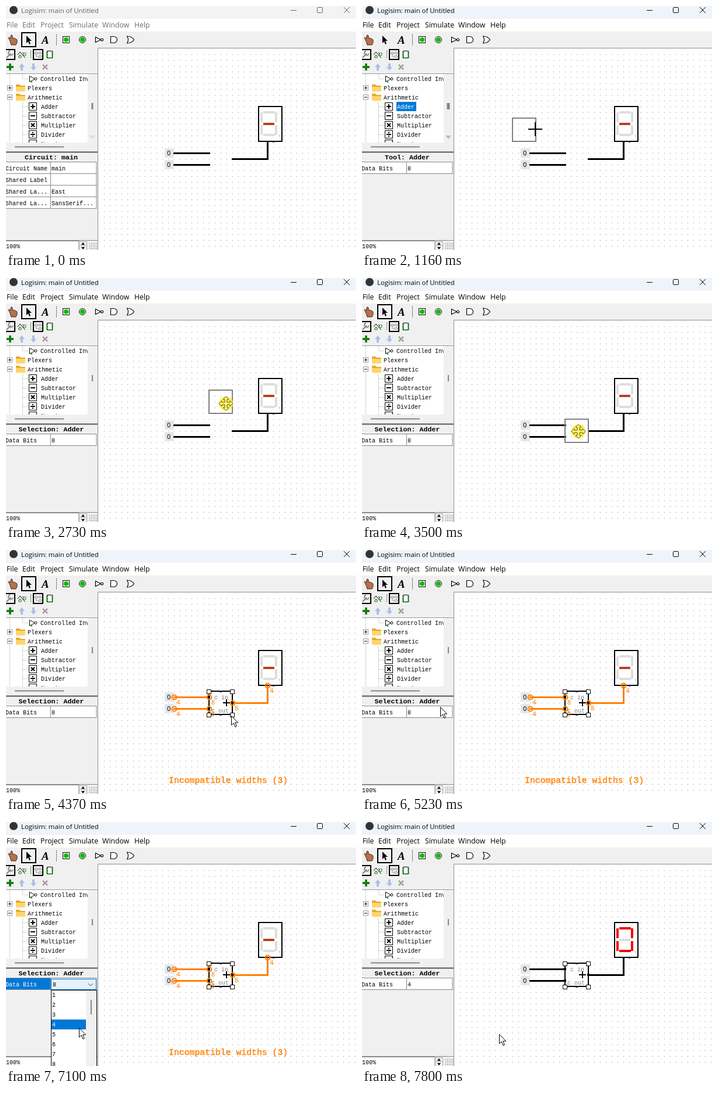
Write an HTML page that moves like this. It is 600x420 px and loops after 8000 ms.

```html
<!DOCTYPE html>
<html lang="en">
<head>
<meta charset="utf-8">
<title>Circuit editor</title>
<style>
  html, body { margin: 0; width: 100%; height: 100%; overflow: hidden; background: #fff; }
  svg { display: block; }
  text { white-space: pre; }
  .ui { font-family: "Open Sans", "Noto Sans", sans-serif; }
  .mono { font: 10px "Liberation Mono", monospace; }
  .head { font: bold 11.67px "Liberation Mono", monospace; }
  .num { font: 11px "Noto Sans", sans-serif; }
  .line { fill: none; stroke: #000; }
  .crisp { shape-rendering: crispEdges; }
</style>
</head>
<body>
<svg width="600" height="420" viewBox="0 0 600 420">
  <defs>
    <pattern id="dots" x="8" y="3" width="10" height="10" patternUnits="userSpaceOnUse">
      <rect width="1" height="1" fill="#858585"/>
    </pattern>
    <clipPath id="treeClip"><rect y="117" width="140" height="118"/></clipPath>
  </defs>

  <!-- window frame -->
  <rect width="600" height="420" fill="#f0f0f0"/>
  <rect id="bar" width="600" height="22" fill="#f3f3f3"/>
  <rect y="22" width="600" height="22" fill="#fff"/>
  <circle cx="13" cy="7" r="7" fill="#333"/>
  <g id="frame" class="ui">
    <text x="26" y="12" font-size="11.4">Logisim: main of Untitled</text>
    <g fill="none" stroke="#000">
      <path d="M488 7.5h10M579 2l10 10M589 2l-10 10"/>
      <rect x="533.5" y="2.5" width="9" height="9" rx="1"/>
    </g>
  </g>
  <g id="menu" class="ui" font-size="12.3"></g>

  <!-- main toolbar -->
  <path d="M6 58c-3-3-2-5 1-3l1 1v-5q2-2 3 0v4q2-1 3 1q2-1 3 1q2 0 2 2v4l-2 4h-8z" fill="#b5714a" stroke="#4a2412"/>
  <rect id="pick" class="line crisp" x="27" y="46" width="24" height="24" stroke-width="2"/>
  <path d="M35 51v13l3-3 2 5 2-1-2-5h4z"/>
  <text x="61" y="65" font-family="Liberation Serif, serif" font-size="19" font-weight="bold" font-style="italic">A</text>
  <path d="M86.5 48v20M42.5 76v14" stroke="#888"/>
  <rect x="97.500" y="52.500" width="11" height="11" fill="#fff" stroke="#000"/>
  <circle cx="103" cy="58" r="4" fill="#00c000"/>
  <circle cx="131" cy="58" r="5.500" fill="#fff" stroke="#000"/>
  <circle cx="131" cy="58" r="4" fill="#00c000"/>
  <g fill="#fff" stroke="#000" stroke-width="1.2">
    <path d="M153.500 53.500l9 4.500-9 4.500z"/><circle cx="164.500" cy="58" r="2"/>
    <path d="M179.500 52.500h5.500a5.500 5.500 0 0 1 0 11h-5.500z"/>
    <path d="M207.500 52q8 0 12 6q-4 6-12 6q4-6 0-12z"/>
  </g>

  <!-- side toolbars -->
  <rect class="line crisp" x="-2" y="75" width="17" height="17" stroke-width="2"/>
  <path d="M1 89l7-7M7 77a4 4 0 1 0 5 5" fill="none" stroke="#888" stroke-width="2"/>
  <path d="M20 84l4-5 4 5M28 80l5 4M24 84v5M28 84l5 5" class="line"/>
  <path d="M22 86h4v3h-4zM30 81h4v4h-4z" fill="#fff" stroke="#187a18"/>
  <rect class="line crisp" x="47" y="75" width="16" height="17" stroke-width="2"/>
  <path d="M49.500 79.500h4v3h-4zM56.500 79.500h4v3h-4zM56.500 85.500h4v3h-4zM52 83v4h4M54 81h2" fill="none" stroke="#999"/>
  <path d="M70.500 77.500h9v12h-9z" fill="#fff" stroke="#000"/>
  <path d="M69 80h3M69 84h3M69 88h3M78 80h3M78 84h3M78 88h3" stroke="#17a317" stroke-width="2"/>
  <path d="M1 105h12M7 99v12" stroke="#087808" stroke-width="3.500"/>
  <path d="M27 99l5 6h-3v6h-4v-6h-3zM47 111l5-6h-3v-6h-4v6h-3z" fill="#a9bfe8"/>
  <path d="M63 101l8 8M71 101l-8 8" stroke="#aaa19b" stroke-width="2.500"/>

  <!-- component tree -->
  <path d="M0 116.500h157" stroke="#999"/>
  <rect y="117" width="140" height="118" fill="#fff"/>
  <g id="tree" class="mono" clip-path="url(#treeClip)">
    <path d="M6.500 117v118M28.500 117v8M28.500 164v71M29 125.500h9" fill="none" stroke="#aaa" stroke-dasharray="1 1"/>
    <path d="M40.500 120.500l9 5-9 5z" fill="#fff" stroke="#000"/><circle cx="51" cy="125.500" r="2" fill="#fff" stroke="#000"/>
    <path d="M44 128v4" stroke="#0a0" stroke-width="2"/>
    <text x="59" y="129">Controlled Inverter</text>
    <rect id="treeSel" x="59" y="165" width="34" height="16" fill="#0078d7"/>
  </g>
  <rect id="thumb" y="167" height="11" fill="#858585"/>
  <path id="down" d="M143 223h10l-5 6z" fill="#bbb"/>
  <path d="M15 242.500h84" stroke="#858585" stroke-width="2"/>
  <path d="M0 251.500h157" stroke="#555" stroke-width="2"/>

  <!-- attributes -->
  <text id="title" class="head" text-anchor="middle" x="77.500" y="264"></text>
  <g id="table" class="mono"></g>
  <path d="M0 403.500h157" stroke="#888"/>
  <rect x="-1" y="404.500" width="126" height="16" fill="#fff" stroke="#888"/>
  <text class="mono" x="0" y="417">100%</text>
  <path d="M125.500 405.500h13v7h-13zM125.500 412.500h13v8h-13z" fill="#f0f0f0" stroke="#aaa"/>
  <path d="M129 411l3-4 3 4zM129 415l3 4 3-4z"/>
  <path d="M143 408.500h13M143 411.500h13M143 414.500h13M143 417.500h13" stroke="#444" stroke-dasharray="1 2"/>

  <!-- canvas -->
  <rect x="157" y="72" width="443" height="348" fill="#fff"/>
  <rect x="159" y="74" width="441" height="346" fill="url(#dots)" class="crisp"/>
  <path d="M157.500 420v-347.500h443" fill="none" stroke="#858b98"/>
  <rect x="433" y="173" width="40" height="60" fill="#fff" stroke="#000" stroke-width="2" class="crisp"/>
  <g id="digit" class="crisp"></g>
  <circle cx="469" cy="223.500" r="2" fill="#ddd"/>
  <rect x="457" y="233" width="3" height="2" fill="#33a"/>
  <path d="M272 245h16v16h-16zM272 265h16v16h-16z" fill="#e6e6e6"/>
  <path id="wires" d="M287 253.500h63M287 273.500h63M387 263.500h61.500v-30" fill="none" stroke-width="3"/>
  <text class="num" x="276" y="257">0</text><text class="num" x="276" y="277">0</text>
  <g id="adder">
    <rect x="-40" y="-20" width="40" height="40" fill="#fff" stroke="#000" stroke-width="2" class="crisp"/>
    <g class="mono" fill="#808080"><text x="-31" y="-6">c in</text><text x="-36" y="17">c out</text></g>
    <path d="M-16 0h12M-10-6v12" stroke="#000" stroke-width="2"/>
    <path d="M-42-12h4v4h-4zM-42 8h4v4h-4zM-2-2h4v4h-4z"/>
    <path d="M-22-21h4v3h-4zM-22 19h4v3h-4z" fill="#225"/>
    <path d="M-43.500-22.500h7v7h-7zM-3.500-22.500h7v7h-7zM-43.500 17.500h7v7h-7zM-3.500 17.500h7v7h-7z" fill="#fff" stroke="#000"/>
  </g>
  <rect id="ghost" class="crisp" x="-40" y="-20" width="40" height="40" fill="none" stroke="#808080" stroke-width="2"/>
  <g id="errors" class="num" fill="#ff8000">
    <text x="279" y="401" font-size="15" style="font:bold 14.800px 'Liberation Mono',monospace;font-weight:500" stroke="#ff8000" stroke-width=".4">Incompatible widths (3)</text>
  </g>

  <g id="popup" class="mono"></g>

  <!-- pointers -->
  <path id="arrow" d="M.5.500v16l3.700-3.500 2.700 6.500 2.500-1-2.700-6.300h5z" fill="#fff" stroke="#000"/>
  <path id="cross" class="crisp" d="M-12 0h24M0-12v24" stroke="#000" stroke-width="2"/>
  <g id="move">
    <circle r="12" fill="#fff04a"/>
    <path d="M0-12l5 5h-3v5h5v-3l5 5-5 5v-3h-5v5h3l-5 5-5-5h3v-5h-5v3l-5-5 5-5v3h5v-5h-3z" fill="#fff47a" stroke="#5c5720"/>
  </g>
</svg>
<script>
const $ = id => document.getElementById(id);
const add = (id, html) => $(id).insertAdjacentHTML('beforeend', html);
const show = (id, on) => { $(id).style.display = on ? '' : 'none'; };
const place = (id, x, y) => $(id).setAttribute('transform', `translate(${x} ${y})`);
const text = (x, y, s, extra = '') => `<text x="${x}" y="${y}" ${extra}>${s}</text>`;

const LOOP = 8000, TICK = 78;

// pointer path: tick, x, y
const path = [
  [0, -14, 225], [10, 74, 176], [12, 76, 176], [15, 297, 212], [22, 384, 198],
  [25, 384, 198], [27, 373, 206], [29, 373, 206], [31, 373, 198], [33, 373, 198],
  [35, 377, 216], [37, 380, 214], [39, 378, 224], [43, 372, 255], [45, 371, 264],
  [50, 371, 264], [61, 398, 302], [62, 385, 306], [67, 134, 270], [70, 99, 274],
  [76, 99, 274], [82, 101, 321], [86, 101, 321], [91, 125, 354], [94, 125, 354],
  [95, 95, 336], [96, 95, 336], [100, 235, 365], [103, 235, 365]
];

function pointer(k) {
  const i = path.findIndex(p => p[0] > k);
  const [a, x, y] = path[i - 1], [b, u, v] = path[i];
  const f = (k - a) / (b - a);
  return [Math.round(x + (u - x) * f), Math.round(y + (v - y) * f)];
}

const snap = (v, base) => base + 10 * Math.round((v - base) / 10);

function buildTree() {
  ['Plexers', 'Arithmetic'].forEach((name, i) => {
    const y = 141 + 16 * i;
    add('tree', `<rect x="2.5" y="${y - 4}" width="8" height="8" fill="#fff" stroke="#999"/>
      <path d="M4 ${y}h5${i ? '' : 'M6.5 ' + (y - 2.5) + 'v5'}" stroke="#000"/>
      <path d="M17 ${y - 6}h6l2 2h8v10h-16z" fill="#e8a92c"/>
      <path d="M17 ${y - 2}h16v8h-16z" fill="#ffd469"/>` + text(37, y + 4, name));
  });
  const signs = ['M-4 0h8M0-4v8', 'M-4 0h8', 'M-3-3l6 6M3-3l-6 6', 'M-4 0h8M-1-3h2M-1 3h2', 'M-4 0h8'];
  ['Adder', 'Subtractor', 'Multiplier', 'Divider', 'Negator'].forEach((name, i) => {
    const y = 173 + 16 * i;
    add('tree', `<path d="M29 ${y}.5h9" stroke="#aaa" stroke-dasharray="1 1"/>
      <rect x="39.5" y="${y - 6.5}" width="13" height="13" fill="#fff" stroke="#000"/>
      <path transform="translate(46 ${y})" d="${signs[i]}" stroke="#000" stroke-width="2"/>` +
      text(60, y + 4, name, i ? '' : 'id="adderName"'));
  });
}

function buildErrors() {
  for (const [x, y, bits] of [[288, 253, 4], [288, 273, 4], [348, 253, 8], [348, 273, 8], [388, 263, 8], [448, 233, 4]])
    add('errors', `<circle cx="${x + .5}" cy="${y + .5}" r="4" fill="none" stroke="#ff8000" stroke-width="2"/>` +
      text(x + 4, y + 13, bits));
}

function table(rows, active) {
  return rows.map(([name, value], i) => {
    const y = 268.5 + 20 * i;
    return `<rect x="-1" y="${y}" width="156" height="20" fill="#fff" stroke="#888"/>` +
      (active ? `<rect y="269" width="77" height="19" fill="#0078d7"/>` : '') +
      `<path d="M76.500 ${y}v20" stroke="#888"/>` +
      text(-1, y + 14, name, active ? 'fill="#fff"' : '') + text(78, y + 14, value) +
      (active ? `<rect x="77.500" y="270.500" width="77" height="18" fill="#e5f1fb" stroke="#0078d7"/>
        <path d="M141 278l4 4 4-4" fill="none" stroke="#444"/>` + text(80, 283, value) : '');
  }).join('');
}

function popup(first, over) {
  let s = `<rect x="77.500" y="289.500" width="78" height="140" fill="#fff" stroke="#000"/>
    <rect x="137" y="290" width="18" height="130" fill="#f0f0f0"/>
    <rect x="145" y="${319 + (first - 5) * 3.2}" width="2" height="25" fill="#858585"/>`;
  for (let i = 0; i < 8; i++) {
    const y = 289 + 17 * i, hot = first + i === over;
    if (hot) s += `<rect x="78" y="${y}" width="59" height="17" fill="#0078d7"/>`;
    s += text(79, y + 12, first + i, hot ? 'fill="#fff"' : '');
  }
  return s;
}

// seven segments, middle one last
function digit(zero) {
  const on = zero ? '#f00000' : '#ddd';
  return [[441, 181, 20, 4], [436, 183, 4, 17], [461, 183, 4, 17], [436, 205, 4, 17],
    [461, 205, 4, 17], [441, 220, 20, 4], [441, 201, 19, 4]].map(([x, y, w, h], i) =>
    `<rect x="${x}" y="${y}" width="${w}" height="${h}" fill="${i < 6 ? on : zero ? '#ddd' : '#b5441a'}"/>`).join('');
}

const mainRows = [['Circuit Name', 'main'], ['Shared Label', ''], ['Shared La...', 'East'], ['Shared La...', 'SansSerif...']];

function draw(k) {
  const [x, y] = pointer(k);
  const active = k >= 11, tool = active && k < 23;
  const drag = k >= 33 && k < 51, fault = k >= 51 && k < 94, fixed = k >= 94;
  const editing = k >= 76 && k < 94, open = k >= 77 && k < 94;
  const aiming = tool && x > 157;

  $('bar').setAttribute('fill', active ? '#eff4fa' : '#f3f3f3');
  $('frame').setAttribute('opacity', active ? 1 : .6);
  $('menu').setAttribute('fill', active ? '#000' : '#6d6d6d');
  show('pick', !tool);
  show('treeSel', tool);
  $('adderName').setAttribute('fill', tool ? '#fff' : '#000');
  const wide = tool ? 5 : k < 23 ? 3 : 2;
  $('thumb').setAttribute('x', 148 - wide / 2);
  $('thumb').setAttribute('width', wide);
  $('down').setAttribute('opacity', k < 11 ? .4 : k < 23 ? 1 : 0);

  $('title').textContent = k < 12 ? 'Circuit: main' : k < 23 ? 'Tool: Adder' : 'Selection: Adder';
  $('table').innerHTML = table(active ? [['Data Bits', fixed ? 4 : 8]] : mainRows, editing);

  const first = k < 80 ? 8 : k < 83 ? 5 : 1;
  show('popup', open);
  if (open) $('popup').innerHTML = popup(first, first + Math.max(0, Math.floor((y - 289) / 17)));

  $('wires').setAttribute('stroke', fault ? '#ff8000' : '#000');
  $('digit').innerHTML = digit(fixed);
  show('errors', fault);
  show('adder', k >= 23 && !drag);
  place('adder', 388, k < 33 ? 193 : 263);
  show('ghost', aiming || drag);
  if (drag) place('ghost', snap(388 + x - 373, 8), snap(193 + y - 198, 3));
  else place('ghost', snap(x, 8), snap(y, 3));

  const cross = aiming || (k >= 23 && k < 26);
  show('cross', cross);
  show('move', drag);
  show('arrow', !cross && !drag && !(k >= 72 && k < 76));
  for (const id of ['cross', 'move', 'arrow']) place(id, x, y);
}

[['File', 1], ['Edit', 28], ['Project', 59], ['Simulate', 108], ['Window', 165], ['Help', 220]]
  .forEach(([s, x]) => add('menu', text(x, 37, s)));
buildTree();
buildErrors();

let last = -1;
const start = performance.now();
function loop(now) {
  const t = Math.max(0, now - start) % LOOP;
  const k = Math.floor((t + 12) / TICK);
  if (k !== last) draw(last = k);
  requestAnimationFrame(loop);
}
draw(0);
requestAnimationFrame(loop);
</script>
</body>
</html>
```
